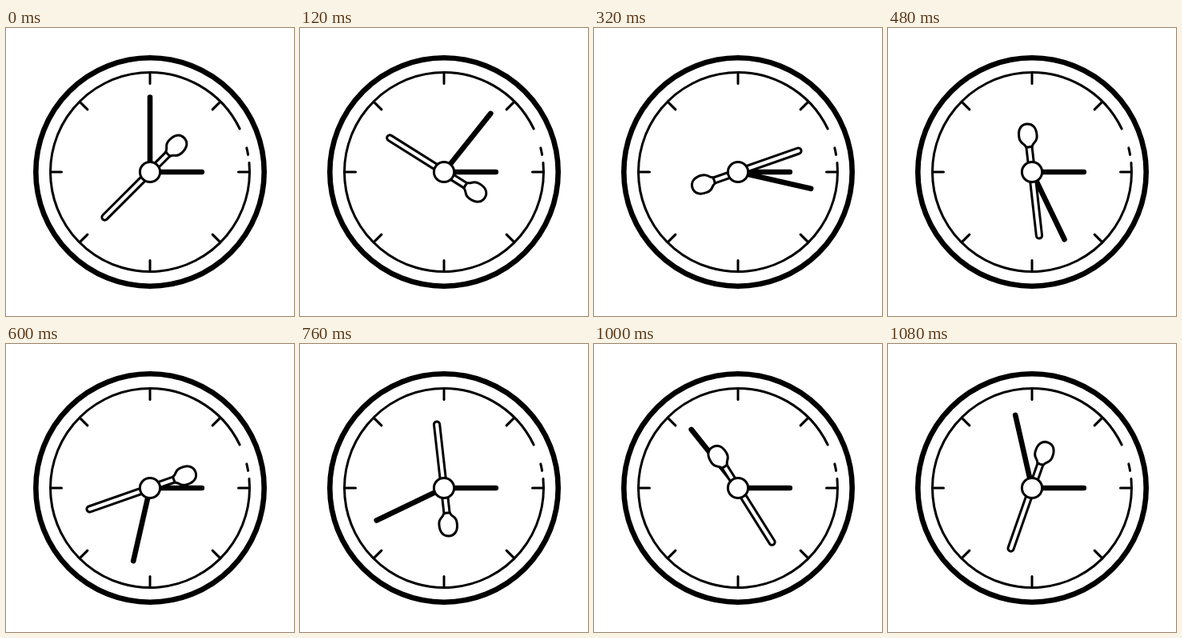
Write an HTML page with a canvas that moves like this. It is 360 px wide and 360 px high and loops after 1120 ms.

```html
<!DOCTYPE html>
<html lang="en">
<head>
<meta charset="utf-8">
<title>Clock</title>
<style>
html, body { margin: 0; width: 100%; height: 100%; overflow: hidden; background: #fff; }
canvas { display: block; width: 360px; height: 360px; }
</style>
</head>
<body>
<canvas id="stage"></canvas>
<script>
const LOOP = 1120, STEP = 40, TAU = Math.PI * 2, DEG = Math.PI / 180;
const canvas = document.getElementById('stage');
const ctx = canvas.getContext('2d');
const ratio = window.devicePixelRatio || 1;
canvas.width = canvas.height = 360 * ratio;

function line(x1, y1, x2, y2, width, color = '#000') {
  ctx.strokeStyle = color;
  ctx.lineWidth = width;
  ctx.beginPath();
  ctx.moveTo(x1, y1);
  ctx.lineTo(x2, y2);
  ctx.stroke();
}

function arc(radius, width, from = 0, to = 360) {
  ctx.strokeStyle = '#000';
  ctx.lineWidth = width;
  ctx.beginPath();
  ctx.arc(0, 0, radius, from * DEG, to * DEG);
  ctx.stroke();
}

function rotated(angle, paint) {
  ctx.save();
  ctx.rotate(angle);
  paint();
  ctx.restore();
}

function dial() {
  arc(142.7, 6.6);
  arc(124.5, 3, -5.3, 334.3);
  arc(124.5, 3, -14, -10);
  for (let i = 0; i < 8; i++) {
    rotated(i * TAU / 8, () => line(0, -124, 0, -110.5, 3));
  }
}

function secondHand() {
  line(0, -80, 0, 33, 10.2);
  line(0, -80, 0, 33, 4.2, '#fff');
  ctx.beginPath();
  ctx.moveTo(-4, 32);
  ctx.bezierCurveTo(-6, 38, -11, 36, -11.2, 45);
  ctx.bezierCurveTo(-11.6, 55, -7, 60.3, 0, 60.3);
  ctx.bezierCurveTo(7, 60.3, 11.6, 55, 11.2, 45);
  ctx.bezierCurveTo(11, 36, 6, 38, 4, 32);
  ctx.quadraticCurveTo(0, 30.8, -4, 32);
  ctx.closePath();
  ctx.fillStyle = '#fff';
  ctx.fill();
  ctx.strokeStyle = '#000';
  ctx.lineWidth = 3;
  ctx.stroke();
}

function hub() {
  ctx.fillStyle = '#fff';
  ctx.beginPath();
  ctx.arc(0, 0, 12.6, 0, TAU);
  ctx.fill();
  arc(12.6, 3);
}

function draw(time) {
  const turn = Math.floor(time % LOOP / STEP) * STEP / LOOP * TAU;
  ctx.setTransform(ratio, 0, 0, ratio, 0, 0);
  ctx.fillStyle = '#fff';
  ctx.fillRect(0, 0, 360, 360);
  ctx.translate(180, 180);
  ctx.lineCap = ctx.lineJoin = 'round';
  dial();
  line(0, 0, 64.8, 0, 6.6);
  rotated(turn, () => line(0, 0, 0, -93.5, 6.6));
  rotated(225 * DEG + turn * 2, secondHand);
  hub();
}

const start = performance.now();
function tick() {
  draw(performance.now() - start);
  requestAnimationFrame(tick);
}
tick();
</script>
</body>
</html>
```
